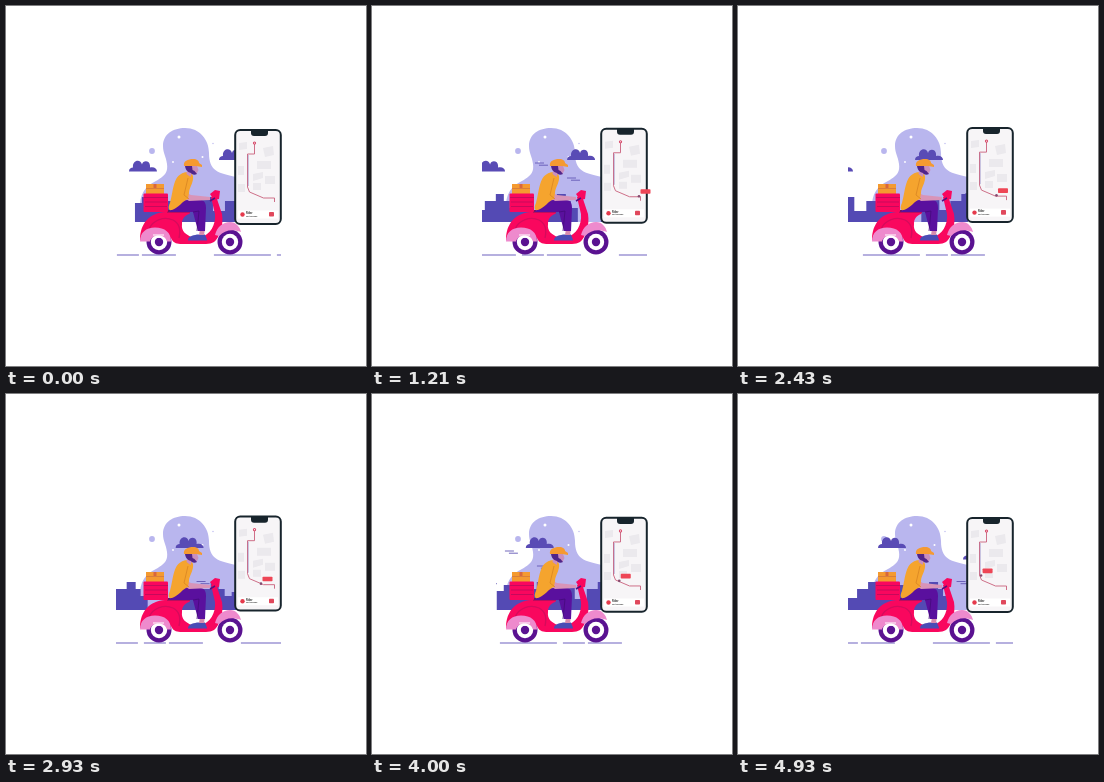
Write an HTML page that moves like this. It is 360 by 360 pixels and loops after 5000 ms.

```html
<!DOCTYPE html>
<html>
<head>
<meta charset="utf-8">
<style>
html, body { margin: 0; width: 100%; height: 100%; overflow: hidden; background: #fff; }
svg { display: block; width: 100vw; height: 100vh; }
</style>
</head>
<body>
<svg viewBox="0 0 360 360">
  <defs>
    <clipPath id="sky"><rect x="110" y="110" width="120" height="130"/></clipPath>
    <clipPath id="gusts"><path d="M124 165h106v30h-106zM124 150h84v15h-84z"/></clipPath>
    <clipPath id="road"><rect x="110" y="240" width="165" height="20"/></clipPath>
    <path id="cloud" fill="#594bb5" d="M0 11c0-3 2-4 4-4-1-8 8-9 9-3 1-5 8-4 8 1v2c4-1 7 1 7 4z"/>
    <g id="wheel">
      <circle r="12.5" fill="#5a1291"/>
      <circle r="8.2" fill="#fff"/>
      <circle r="4.2" fill="#5a1291"/>
    </g>
    <g id="wind" stroke="#6257b5" stroke-width=".9">
      <path d="M0 0h9M4 2.2h9"/>
    </g>
  </defs>

  <g clip-path="url(#sky)">
    <path fill="#b9b6ee" d="M157 140c0-12 10-18 22-18 15 0 24 12 24 25 0 18 9 20 27 24v45h-90c-8-11-8-26 1-35 9-8 22-9 20-23-1-8-4-11-4-18z"/>
    <circle cx="146" cy="145" r="2.9" fill="#b9b6ee"/>
    <circle cx="207" cy="137.5" r=".7" fill="#b9b6ee"/>
    <g fill="#fff">
      <circle cx="173" cy="131" r="1.5"/><circle cx="196.5" cy="151" r="1"/><circle cx="167" cy="156" r=".9"/>
    </g>
    <path id="city" fill="#544ab4"/>
    <use id="lowCloud" href="#cloud"/>
    <use id="nextCloud" href="#cloud"/>
    <use id="highCloud" href="#cloud"/>
    <g clip-path="url(#gusts)">
      <use id="windA" href="#wind"/>
      <use id="windB" href="#wind"/>
      <use id="windC" href="#wind"/>
    </g>
  </g>
  <g clip-path="url(#road)">
    <path id="dashes" stroke="#b6b0df" stroke-width="1.8"/>
  </g>

  <g id="phone">
    <rect x="229.2" y="123.9" width="45.6" height="94" rx="5" fill="#f7f5f7" stroke="#17242c" stroke-width="2"/>
    <path fill="#17242c" d="M245 124h17v3q0 3-3 3h-11q-3 0-3-3z"/>
    <path fill="#ebe9ed" d="M233 137l8-1v7l-8 1zM257 142l10-2 1 9-9 2zM251 155h14v8h-14zM232 160h6v9h-6zM247 168l10-2v6l-10 3zM259 170h10v8h-10zM232 178h7v8h-7zM247 177h8v7h-8z"/>
    <path d="M248.5 137v11H241.5V181l2 5 14 6h11v4" fill="none" stroke="#c9607c" stroke-width=".9"/>
    <path d="M242.3 149v31" stroke="#8578bd" stroke-width=".5"/>
    <circle cx="248.5" cy="137" r="1.6" fill="#d84566"/>
    <circle cx="248.5" cy="137" r=".6" fill="#fff"/>
    <rect x="232" y="204.5" width="40" height="8" fill="#fff"/>
    <circle cx="236.5" cy="208.5" r="2.2" fill="#e53a4c"/>
    <g font-family="Roboto, sans-serif" font-weight="700" fill="#333">
      <text x="240" y="208.3" font-size="2.7">Rider</text>
      <text x="240" y="210.7" font-size="2.3">On the way</text>
    </g>
    <rect x="263" y="206" width="5" height="4.6" rx=".8" fill="#e0485c"/>
    <g id="marker">
      <circle cx="-1.5" cy="7" r="1.3" fill="#854b70"/>
      <rect width="10" height="4.6" rx=".8" fill="#ee4656"/>
    </g>
  </g>

  <g id="scooter">
    <use href="#wheel" x="153" y="236"/>
    <use href="#wheel" x="224" y="236"/>
    <path fill="#f9075e" d="M134 234c0-17 10-27 25-28l23-1c2 0 3 2 1 3-5 2-7 5-7 10-1 7 4 11 10 13h9c9-2 15-12 14-23l-4-17 5-1 6 18c2 12-3 24-8 28-2 1-5 2-8 2h-24c-5 0-8-1-10-4-3-8-20-8-24 0z"/>
    <path d="M143 223c4-9 15-13 24-9 6 3 8 9 6 18" fill="none" stroke="#d50b5c" stroke-width="1.3"/>
    <path fill="#ee8acd" d="M134 235.5c0-9 6-14 15-14 10 0 16 5 16 14h-4c-2-8-15-8-17 0z"/>
    <path d="M147 229h11M149 231.3h7" stroke="#fff" stroke-width="1.1"/>
    <path fill="#ee8acd" d="M209 229c2-8 8-13 15-13 6 0 10 5 11 10-9-3-16-2-22 4z"/>
    <path fill="#f9075e" d="M204 188l5-4 5 1-1 8-5 1z"/>
    <path d="M204 195l5-3" stroke="#55117f" stroke-width="1.5"/>
    <path fill="#7a155c" d="M161 204h23v2.5h-23z"/>
    <g id="parcels">
      <rect x="140" y="178" width="18" height="10" fill="#f49a31"/>
      <path d="M140 182.5h18" stroke="#cf7340" stroke-width=".7"/>
      <path d="M147.5 178h3v4h-3z" fill="#d8663e"/>
      <rect x="137.5" y="187.5" width="24.5" height="18.5" rx="1" fill="#f9075e"/>
      <path d="M138 191.5h24M139 196h22M139 200.5h22" stroke="#b90b5c" stroke-width=".8"/>
    </g>
    <path fill="#4a4cb5" d="M182 234.5c0-4 4-5 9-6h8c1 3 2 4 2 6z"/>
    <path fill="#d88caf" d="M194 223h5l-1 6h-5z"/>
    <path fill="#5a109e" d="M163 206c3-8 10-12 19-12h12c5 0 6 4 6 8l-1 23h-7l-5-19z"/>
    <path d="M187 206l6-1-2 20" fill="none" stroke="#450b7c" stroke-width=".8"/>
    <path fill="#d894b8" d="M179 186l6 3 19 2v3l-21 1-6-4z"/>
    <path fill="#f5a42e" d="M175 168c4-3 11-2 12 2 1 6-4 12-4 17l-1 6c-6 2-8 8-16 11-4 1-4-3-2-7 3-10 3-25 11-29z"/>
    <path d="M182 172l-4 17 5 4" fill="none" stroke="#d98523" stroke-width=".8"/>
    <path fill="#c98fbe" d="M182 160h9l1.5 4-2 4h-5l-1 3-4-3z"/>
    <path fill="#50258a" d="M179 159l7 1 .5 4 2 1 2.500 3c-2 1-5 1-6-1-4-1-6-4-6-8z"/>
    <path fill="#f59a31" d="M178 160c-1-5 4-7 9-7 4 0 6 2 6 4l3 2v2l-6-1z"/>
  </g>
</svg>
<script>
const LOOP = 5;
const SKYLINE = [[0, 197], [7, 191], [18, 204], [29, 195], [40, 188], [48, 195], [54, 202],
  [61, 198], [66, 191], [78, 205], [90, 195], [101, 188], [110, 195], [115, 202]];
const DASHES = [[0, 57], [63, 85], [88, 122]];
// time, x, y of the red tag on the map
const TAG = [[0.65, 272, 186], [1.21, 268.5, 184.5], [1.93, 263.5, 184.5], [2.93, 256.5, 184],
  [3.57, 252, 181.5], [4.5, 245, 178], [5, 244.5, 174]];

const el = id => document.getElementById(id);
const wrap = (x, period) => ((x % period) + period) % period;
const move = (id, x, y) => el(id).setAttribute('transform', `translate(${x} ${y})`);

const cityTile = x => `M${x} 216` + SKYLINE.map(([dx, y]) => `H${x + dx}V${y}`).join('') + `H${x + 122}V216z`;
el('city').setAttribute('d', cityTile(0) + cityTile(145) + cityTile(290));
el('dashes').setAttribute('d', [0, 160, 320]
  .flatMap(x => DASHES.map(([a, b]) => `M${x + a} 249H${x + b}`)).join(''));

function tagAt(t) {
  const i = Math.max(1, TAG.findIndex(key => key[0] >= t));
  const [t0, x0, y0] = TAG[i - 1], [t1, x1, y1] = TAG[i];
  const p = (t - t0) / (t1 - t0);
  return [x0 + (x1 - x0) * p, y0 + (y1 - y0) * p];
}

function draw(t) {
  const drift = 14.8 * t, gust = 73.5 * t;
  move('lowCloud', 123 - drift, 154.5);
  move('nextCloud', 298 - drift, 154.5);
  move('highCloud', 213 - drift, 143);
  move('city', wrap(129 - 37.3 * t, 145) - 145, 0);
  move('dashes', wrap(208 - 100 * t, 160) - 160, 0);
  move('windA', 60 + wrap(399 - gust, 175), 172);
  move('windB', 80 + wrap(347 - gust, 175), 157);
  move('windC', 60 + wrap(346 - gust, 175), 187.5);

  move('phone', 0, t < 4.2 ? Math.cos(2 * Math.PI * t / 4.2) - 1 : 0);
  move('marker', ...tagAt(t));
  el('marker').style.display = t < TAG[0][0] ? 'none' : '';
}

function frame() {
  draw(performance.now() / 1000 % LOOP);
  requestAnimationFrame(frame);
}
frame();
</script>
</body>
</html>
```
